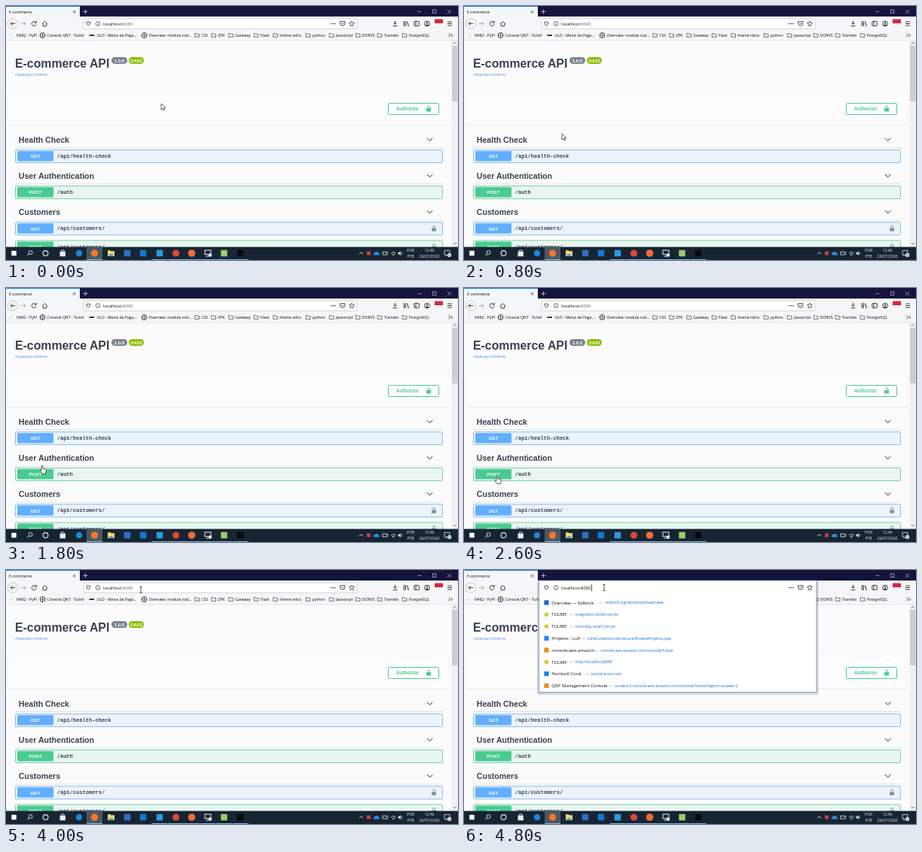
An HTML page that plays this animation: 600 by 338 pixels, repeating every 5 s.

```html
<!DOCTYPE html>
<html lang="en">
<head>
<meta charset="utf-8">
<title>E-commerce API</title>
<style>
html, body { margin: 0; width: 100%; height: 100%; overflow: hidden; background: #fcfbfc; }
svg { display: block; width: 600px; height: 338px; }
text { font-family: "Open Sans", "Noto Sans", sans-serif; white-space: pre; }
.b { font-family: "Liberation Sans", Arial, sans-serif; font-weight: 700; }
.m { font-family: "Liberation Mono", "Courier New", monospace; font-weight: 700; }
</style>
</head>
<body>
<svg id="stage" viewBox="0 0 600 338"></svg>
<script>
const INK = '#3b4151', BLACK = '#0c0c0d', ICON = '#3c3c44', BLUE = '#61affe', GREEN = '#49cc90';

const rect = (x, y, w, h, fill, more = '') =>
  `<rect x="${x}" y="${y}" width="${w}" height="${h}" fill="${fill}" ${more}/>`;
const disc = (x, y, r, fill, more = '') =>
  `<circle cx="${x}" cy="${y}" r="${r}" fill="${fill}" ${more}/>`;
const line = (d, color = ICON, w = 1, more = '') =>
  `<path d="${d}" fill="none" stroke="${color}" stroke-width="${w}" ${more}/>`;
const shape = (d, fill) => `<path d="${d}" fill="${fill}"/>`;
const text = (x, y, size, s, fill = BLACK, more = '') =>
  `<text x="${x}" y="${y}" font-size="${size}" fill="${fill}" ${more}>${s}</text>`;
const mid = 'text-anchor="middle"', bold = 'class="b"';
const square = (x, y, s, fill) => rect(x - s / 2, y - s / 2, s, s, fill, 'rx=".6"');
const globe = (x, y) => disc(x, y, 3.4, 'none', `stroke="${ICON}"`) +
  line(`M${x - 3.4} ${y}h6.8M${x} ${y - 3.4}v6.8`, ICON, .7);
const folder = (x, y) => line(`M${x - 2.8} ${y + 2.3}v-4.8h2.2l.8 1h2.8v3.8z`, '#55555c', .8);
const lock = (x, y, color) => rect(x - 3, y - .8, 6, 4.6, color, 'rx=".6"') +
  line(`M${x - 1.7} ${y - 1.8}a1.75 1.75 0 0 1 3.5 0v1.4`, color, 1);

function titleBar() {
  return rect(0, 0, 600, 14, '#14143e') + rect(0, 0, 98, 14.5, '#f5f6f7') +
    rect(0, 0, 98, 1, '#0a84ff') + text(4, 10, 5.2, 'E-commerce') +
    line('M88.8 6l3.6 3.6m0-3.6l-3.6 3.6', ICON, .8) +
    line('M102.4 7.5h6M105.4 4.5v6', '#d8d8e4', .8) +
    line('M546.5 7.5h4.5M586 5l5 5m0-5l-5 5', '#c4c4d2', .7) +
    rect(566.5, 5, 4.4, 4.4, 'none', 'stroke="#c4c4d2" stroke-width=".7"');
}

function toolbar() {
  return rect(0, 14, 600, 32, '#f6f6f8') + rect(0, 45.6, 600, .6, '#d4d4d8') +
    disc(9, 23.5, 6.6, '#fff', 'stroke="#a9a9ae" stroke-width=".7"') +
    line('M12.3 23.5h-6.2m2.8-2.8l-2.8 2.8l2.8 2.8') +
    line('M20 23.5h6.2m-2.8-2.8l2.8 2.8l-2.8 2.8', '#aaaab0') +
    line('M39.6 21.8a3 3 0 1 0 .5 2.4M40.3 19.6v2.6h-2.6') +
    line('M48 24l3.5-3.5l3.5 3.5M49.2 23.5v3.3h4.6v-3.3') +
    line('M516.5 19.8v4.4m-2-1.8l2 2l2-2M513.6 26.6h5.8') +
    line('M528.4 20v7M530.4 20v7M532.4 20.3l2 6.7', ICON, 1.1) +
    rect(541.8, 20.4, 6.6, 6, 'none', `stroke="${ICON}" rx=".8"`) + line('M544 20.4v6') +
    disc(559, 23.5, 3.4, 'none', `stroke="${ICON}"`) + disc(559, 22.6, 1.2, ICON) +
    shape('M556.6 25.6q2.4-2 4.8 0q-2.4 2-4.8 0z', ICON) +
    rect(569, 17.6, 11, 5.4, '#d7263d', 'rx=".6"') +
    line('M586 21h6M586 23.5h6M586 26h6');
}

function bookmarks() {
  const folders = [[253.5, 'CSS'], [275.5, 'ZPK'], [298.5, 'Gateway'], [332, 'Flask'], [357.5, 'theme relics'],
    [401, 'python'], [432, 'Javascript'], [467, 'DORVS'], [496, 'Tramelo'], [529, 'PostgreSQL']];
  return text(14, 41, 5.1, 'N482 - PyPI') + disc(6.5, 39, 2.4, '#ececf0') +
    globe(48.5, 39) + text(54.5, 41, 5.1, 'Console QNT - Tulref') +
    rect(110.5, 38, 6.5, 2, '#30364a') + text(120.5, 41, 5.1, 'ULO - Meios de Paga...') +
    globe(183.5, 39) + text(189.5, 41, 5.1, 'Overview: module cod...') +
    folders.map(([x, s]) => folder(x, 39) + text(x + 5.8, 41, 5.1, s)).join('') +
    line('M587.5 36.8l2.2 2.2l-2.2 2.2m3-4.4l2.2 2.2l-2.2 2.2', ICON, .9);
}

function addressBar() {
  return rect(103, 17, 363, 13.4, '#fff', 'rx="1" stroke="#c6c6cb" stroke-width=".7"');
}

function addressIcons() {
  return line('M109.3 20.8l2.4.8q.1 3.4-2.4 4.8q-2.5-1.4-2.4-4.8z', ICON, .9) +
    disc(122, 23.5, 2.9, 'none', 'stroke="#55555c" stroke-width=".8"') + line('M122 23v2.2M122 21.3v.9', '#55555c', .8) +
    [431.7, 434.3, 436.9].map(x => disc(x, 23.5, .85, ICON)).join('') +
    line('M443.5 20.6h6.4v2.5a3.2 3.2 0 0 1-6.4 0zM445 22.4l1.7 1.6l1.7-1.6', ICON, .9) +
    line('M459 20l1 2.3l2.5.2l-1.9 1.7l.6 2.5l-2.2-1.3l-2.2 1.3l.6-2.5l-1.9-1.7l2.5-.2z', ICON, .8);
}

function operation(y, verb, path, locked) {
  const get = verb === 'GET', color = get ? BLUE : GREEN;
  return rect(12.5, y, 567, 17, get ? '#ebf3fb' : '#e8f6f0',
      `rx="1.6" stroke="${get ? '#86bfec' : '#78d0a8'}"`) +
    rect(15, y + 1.5, 48, 13.5, color, 'rx="1.4"') +
    text(39, y + 10.7, 6.2, verb, '#fff', `${bold} ${mid}`) +
    text(67.7, y + 10.5, 7.05, path, INK, 'class="m"') +
    (locked ? lock(568, y + 8.2, '#8d929b') : '');
}

const section = (y, name) => text(16.8, y + 3.7, 10.6, name, INK, bold) +
  line(`M559 ${y - 2.2}l3.7 3.6l3.7-3.6`, '#26262b', 1) +
  rect(12, y + 10.3, 568, .7, '#d5d7dc');

function page() {
  return rect(0, 46, 600, 275, '#fcfbfc') +
    text(12, 82.2, 15.85, 'E-commerce API', INK, bold) +
    rect(140, 68, 21, 9, '#7d8492', 'rx="4.5"') + text(150.5, 74.6, 6, '1.0.0', '#fff', `${bold} ${mid}`) +
    rect(163, 68, 20, 9, '#89bf04', 'rx="4.5"') + text(173, 74.6, 5.7, 'OAS3', '#fff', `${bold} ${mid}`) +
    text(12, 92.7, 5.3, '/openapi-schema', '#4990e2') +
    rect(2.5, 114, 586, 44, '#fdfcfd', 'stroke="#f4f3f5" stroke-width=".8"') + rect(2.5, 158, 586, .8, '#e8e8ea') +
    rect(507.5, 129.5, 67, 15, '#fff', `rx="1.8" stroke="${GREEN}"`) +
    text(518, 139.3, 6.5, 'Authorize', GREEN, bold) + lock(561, 136.6, GREEN) +
    section(178, 'Health Check') + operation(191.5, 'GET', '/api/health-check') +
    section(226.2, 'User Authentication') + operation(239.5, 'POST', '/auth') +
    section(274.4, 'Customers') + operation(287.8, 'GET', '/api/customers/', true) +
    operation(312, 'POST', '/api/customers/', true) +
    rect(591.5, 46, 8.5, 275, '#f0f0f0') + rect(592, 53, 7.5, 74, '#cdcdcd') +
    line('M593.8 50.5l2-2l2 2M593.8 315l2 2l2-2', '#606060', .9);
}

function taskbar() {
  const apps = [[161, '#2f6fc4'], [182, '#1278cf'], [204, '#2a9be0'], [289.5, '#9bcf6a'], [311, '#0a0a0c']];
  const white = '#e8edf2';
  return rect(0, 320.6, 600, 17.4, '#172532') + rect(107, 320.6, 21, 17.4, '#4a5863') +
    square(10.5, 329, 6.5, '#fff') +
    disc(32.5, 328, 2.5, 'none', `stroke="${white}" stroke-width=".9"`) + line('M30.7 329.9l-2.3 2.5', white) +
    disc(52.5, 329, 3.4, 'none', `stroke="${white}" stroke-width="1.1"`) +
    rect(71.5, 326.6, 7.4, 6.6, white) + line('M73.5 326.6v-1.8h3.4v1.8', white, .8) +
    disc(97, 329, 4.2, '#1b87d8') + disc(117.5, 329, 4.7, '#f5772b') +
    rect(135, 325, 4, 2, '#e9b83e') + rect(135, 326.2, 9, 6.6, '#f8d775') + rect(137, 330, 5, 2.8, '#4aa3df') +
    apps.map(([x, c]) => square(x, 329, 8.4, c)).join('') +
    disc(225.5, 329, 4.6, '#d9483b') + disc(246.5, 329, 4.8, '#f26b3a') +
    rect(264, 325, 8, 5.6, 'none', `stroke="${white}"`) + line('M265.5 333h4', white) + disc(271, 331.5, 2.2, white) +
    [107, 193.5, 215, 236, 257.5, 279, 300.5].map(x => rect(x, 337, 21, 1, '#76b9ed')).join('') +
    line('M469 330.2l2.5-2.5l2.5 2.5', white, .9) +
    square(481.5, 329, 5, '#c93f3f') +
    shape('M488.5 331.5a1.8 1.8 0 0 1 1-3.2a3 3 0 0 1 5.2.5a1.5 1.5 0 0 1 .5 2.7z', '#2b8fe0') +
    rect(500, 327.2, 6, 3.8, 'none', `stroke="${white}" stroke-width=".8"`) + rect(506.5, 328.4, .8, 1.4, white) +
    line('M511 329.2q3.3-3.4 6.6 0M512.6 330.7q1.7-1.7 3.4 0', white, .8) + disc(514.3, 331.8, .7, white) +
    shape('M520.5 328h1.4l1.9-1.8v5.8l-1.9-1.8h-1.4z', white) + line('M525 327.3q1.4 1.8 0 3.6', white, .7) +
    text(537, 327.2, 5.1, 'POR', white, mid) + text(537, 335.2, 5.1, 'PTB', white, mid) +
    text(562, 327.2, 5.1, '12:46', white, mid) + text(562, 335.2, 5.1, '26/07/2020', white, mid) +
    line('M582 325.4h7v5.6h-3l-2 2v-2h-2z', white, .8) +
    disc(588.6, 331.4, 2.6, '#dfe5ea') + text(588.6, 333, 4.3, '2', '#111', mid);
}

function suggestions() {
  const yellow = '#e8c23a', rows = [
    ['#2065c9', 'Overview — Stilbrick', 187, 'stilbrick.org/dashboard/overview'],
    [yellow, 'TULREF', 148, 'integrador.tulref.com.br'],
    [yellow, 'TULREF', 148, 'homolog.tulref.com.br'],
    ['#2684ff', 'Projetos - Lufi', 164, 'tulref.atlassian.net/secure/BrowseProjects.jspa'],
    ['#f08a24', 'console.aws.amazon', 181, 'console.aws.amazon.com/console/home'],
    [yellow, 'TULREF', 148, 'http://localhost:8080'],
    ['#1683d8', 'Nortisoll Coral', 169, 'portal.azure.com'],
    ['#f08a24', 'QNT Management Console', 200, 'us-west-2.console.aws.amazon.com/console/home?region=us-west-2']];
  return [3, 2, 1].map(d => rect(99.5 - d, 15, 368.5 + 2 * d, 147.7 + d * 1.3, '#000', 'opacity=".08" rx="2"')).join('') +
    rect(99.5, 14, 368.5, 148.7, '#fff', 'stroke="#6f9bd0" stroke-width=".8"') +
    rows.map(([color, title, x, url], i) => {
      const y = 43.4 + i * 15.8;
      return (color === yellow ? disc(109.5, y, 2.8, color) : square(109.5, y, 6.2, color)) +
        text(116.3, y + 2.1, 5.9, title) + text(x - 7.8, y + 2, 5.1, '—', '#85858c') +
        text(x, y + 2, 5.08, url, '#0a6ccf');
    }).join('');
}

const pointers = {
  arrow: '<path d="M0 0v8l1.9-1.8l1.4 3l1.4-.7l-1.4-2.8h2.5z" fill="#fff" stroke="#222" stroke-width=".7"/>',
  hand: '<path d="M-.9 .8q.9-1.4 1.8 0v3.4l3.4.8q1 .3.9 1.4l-.6 4.6h-4.8l-2.6-3.6q-.2-1.4 1.9-.4z" fill="#fff" stroke="#222" stroke-width=".7"/>',
  beam: line('M-1.6-4h3.2M0-4v8M-1.6 4h3.2', '#222', .8)
};

// Pointer track: step at which it arrives, tip position, look
const track = [[0, 206, 130, 'arrow'], [3, 190, 138, 'arrow'], [4, 130, 170, 'arrow'], [5, 75, 200, 'hand'],
  [6, 55.5, 206.3, 'hand'], [8, 52, 216, 'hand'], [9, 48, 236, 'hand'], [10, 45, 250, 'hand'], [13, 44, 249.5, 'hand'],
  [17, 80, 165, 'arrow'], [18, 140, 85, 'arrow'], [19, 172, 40, 'arrow'], [20, 179, 26.3, 'beam'],
  [21, 180, 26.3, 'beam'], [22, 182, 25, 'beam'], [23, 185, 24, 'beam'], [24, 186, 23.3, 'beam']];

const stage = document.getElementById('stage');
stage.innerHTML = page() + titleBar() + toolbar() + bookmarks() + addressBar() +
  `<g id="list">${suggestions()}</g>` + addressIcons() +
  rect(128.3, 18.6, 40.2, 9.8, '#0a6cd6', 'id="mark"') +
  '<text id="url" x="129" y="26" font-size="5.85"><tspan>localhost</tspan><tspan id="port">:8000</tspan></text>' +
  rect(169.2, 18.8, .7, 9.4, '#111', 'id="caret"') + taskbar() + '<g id="pointer"></g>';

const $ = id => document.getElementById(id);
const show = (id, on) => $(id).setAttribute('visibility', on ? 'visible' : 'hidden');
let last = -1;

function draw(now) {
  const step = Math.floor(now % 5000 / 200);
  if (step !== last) {
    last = step;
    const open = step >= 21, marked = open && step < 23;
    show('list', open);
    show('mark', marked);
    show('caret', open && !marked);
    $('url').setAttribute('fill', marked ? '#fff' : BLACK);
    $('port').setAttribute('fill', marked ? '#fff' : open ? BLACK : '#66666c');
    const [, x, y, look] = track.filter(k => k[0] <= step).pop();
    $('pointer').setAttribute('transform', `translate(${x} ${y})`);
    $('pointer').innerHTML = pointers[look];
  }
  requestAnimationFrame(draw);
}
draw(performance.now());
</script>
</body>
</html>
```
